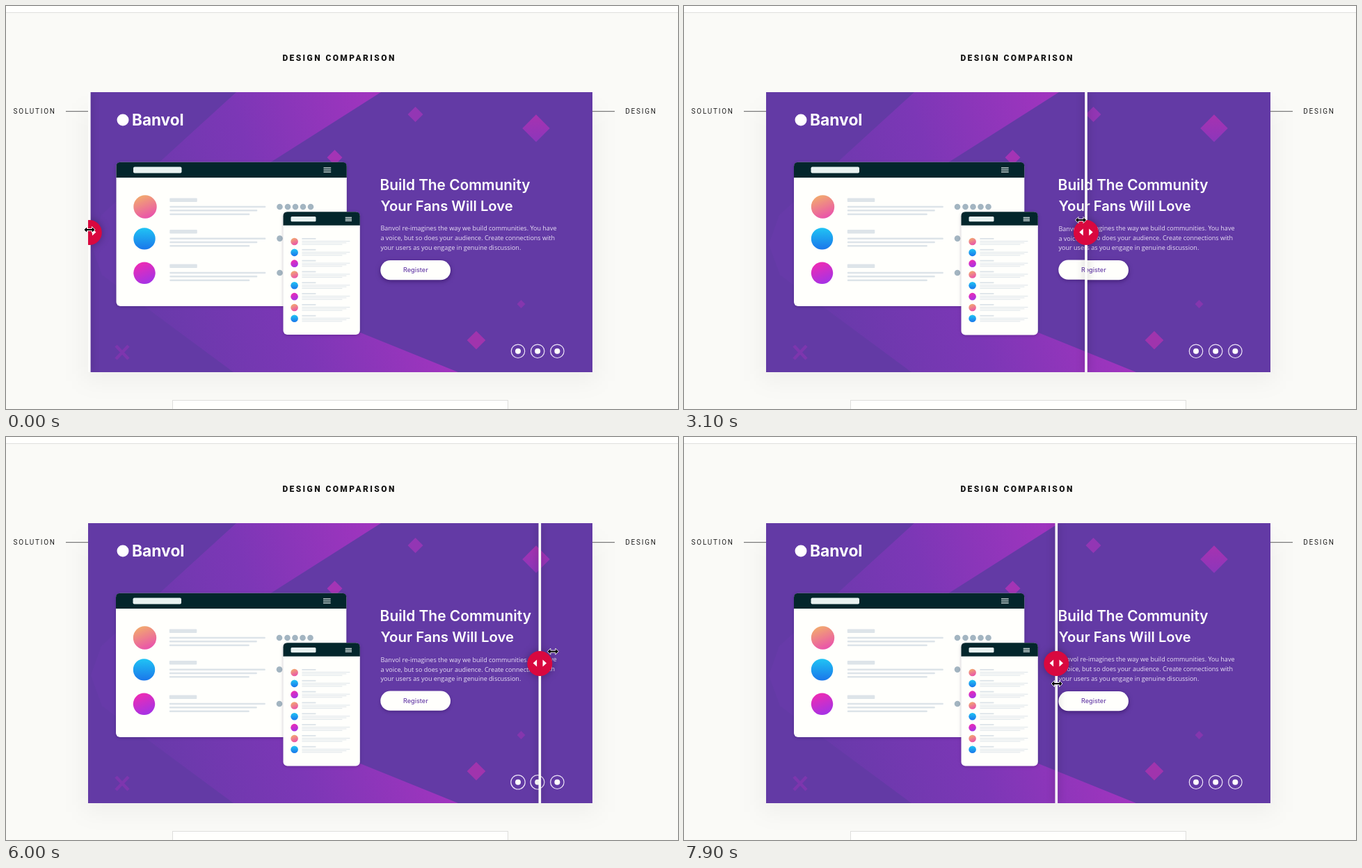
Recreate the animation shown at these times as an HTML page. Size 966 by 580 pixels, loop 8 s.

```html
<!DOCTYPE html>
<html lang="en">
<head>
<meta charset="utf-8">
<title>Design comparison</title>
<style>
html, body { margin: 0; width: 100%; height: 100%; overflow: hidden; background: #fafaf7; }
svg { display: block; }
.label { font: 400 10px Roboto, sans-serif; letter-spacing: 1.74px; fill: #222; }
.title { font: 900 12px Roboto, sans-serif; letter-spacing: 2.4px; fill: #151515; }
.brand { font: 700 22.5px Inter, sans-serif; fill: #fff; }
.head { font: 600 20.8px Inter, sans-serif; fill: #fff; }
.body { font: 400 9.03px "Open Sans", sans-serif; fill: #e9e0f5; }
.button { font: 500 9.1px Inter, sans-serif; fill: #6a41a9; text-anchor: middle; }
.soft { filter: drop-shadow(0 1px 2px rgba(20, 0, 50, .25)); }
.slider { filter: drop-shadow(0 0 6px rgba(0, 0, 0, .3)); }
</style>
</head>
<body>
<svg id="stage" width="966" height="580" viewBox="0 0 966 580"></svg>
<script>
const LEFT = 118, RIGHT = 843, TOP = 124, BOTTOM = 527, LOOP = 8000;

const rect = (x, y, w, h, fill, r = 0) =>
  `<rect x="${x}" y="${y}" width="${w}" height="${h}" rx="${r}" fill="${fill}"/>`;
const circle = (x, y, r, fill) => `<circle cx="${x}" cy="${y}" r="${r}" fill="${fill}"/>`;
const path = (d, fill) => `<path d="${d}" fill="${fill}"/>`;
const text = (x, y, style, s, extra = '') => `<text x="${x}" y="${y}" class="${style}" ${extra}>${s}</text>`;
const gradient = (id, from, to, dir = 'x2="0" y2="1"') =>
  `<linearGradient id="${id}" ${dir}><stop stop-color="${from}"/><stop offset="1" stop-color="${to}"/></linearGradient>`;
const diamond = (x, y, r, fill) => path(`M${x} ${y - r}l${r} ${r} ${-r} ${r} ${-r} ${-r}z`, fill);
const menu = (x, y, w, gap) => [0, 1, 2].map(i => rect(x, y + i * gap, w, 1.3, '#dfe9e8')).join('');
const avatars = ['url(#sun)', 'url(#sky)', 'url(#pink)'];

function panel(x, y, w, h, bar) {
  return `<g class="soft">${rect(x, y, w, h, '#fffffc', 6)}</g>` +
    path(`M${x} ${y + bar}v${6 - bar}q0-6 6-6h${w - 12}q6 0 6 6v${bar - 6}z`, '#03262c');
}

function desktop() {
  let s = panel(158.5, 224.7, 331.3, 207.3, 22.3) +
    rect(183, 231.5, 69.5, 9, '#e8f2f1', 2) + menu(456.5, 232.4, 10.7, 2.9);
  [0, 45.6, 95].forEach((dy, i) => {
    s += circle(i ? 199 : 200, 289 + dy + (i ? .3 : 0), i ? 15.7 : 16.7, avatars[i]) +
      rect(235.3, 276.5 + dy, 39.5, 5.4, '#dde4e9', 1);
    [138, 126, 115].forEach((w, k) => s += rect(235.3, 287.8 + dy + k * 5.3, w, 2.5, '#dde4e9', 1));
    s += circle(393.5, 289 + dy, 4.3, '#a3b5c1');
  });
  for (let x = 405; x < 440; x += 11) s += circle(x, 289, 4.3, '#a3b5c1');
  return s;
}

function phone(h) {
  let s = panel(398.5, 296.2, 110.3, h, 19.5) +
    rect(409.5, 303, 36, 7.3, '#e8f2f1', 1.5) + menu(487.7, 303.8, 9.3, 2.3);
  for (let i = 0; i < 8; i++) {
    const y = 339 + i * 15.83;
    s += circle(414.6, y, 5.3, avatars[i % 3]) + rect(425.4, y - 5, 20, 1.9, '#dde4e9');
    [69, 64, 58].forEach((w, k) => s += rect(425.4, y - 1 + k * 2.3, w, 1, '#dde4e9'));
  }
  return s;
}

// The built page differs from the design by fractions of a pixel.
function page(built) {
  const scale = size => `style="font-size:${size}px"`;
  const size = built ? 20.95 : 20.8;
  const lift = built ? .5 : 0;
  let s = rect(LEFT, TOP, RIGHT - LEFT, BOTTOM - TOP, '#633aa5') +
    path('M331 124H539L300 276V385L650 527H327L138 387 122 343 137 301z', 'url(#band)') +
    diamond(588.5, 156, 11, '#9336b4') + diamond(762, 176, 19.7, 'url(#gem)') +
    diamond(472.5, 218, 11, '#a434b5') + diamond(740.5, 429, 6, '#8536ae') +
    diamond(676, 481, 13.3, '#a034ad') +
    '<path d="M158 489l18 19m0-19l-18 19" stroke="#7d36ae" stroke-width="4.6"/>' +
    circle(168, 164, 8.5, '#fff') + text(181, 172.3, 'brand', 'Banvol', scale(built ? 22.8 : 22.5)) +
    `<g transform="translate(${-lift} 0)">${desktop()}</g>` + phone(built ? 177.3 : 176.7) +
    text(537.6, 265.3, 'head', 'Build The Community', scale(size)) +
    text(538.6, 295.4, 'head', 'Your Fans Will Love', scale(size - .6));
  ['Banvol re-imagines the way we build communities. You have',
    'a voice, but so does your audience. Create connections with',
    'your users as you engage in genuine discussion.'
  ].forEach((line, i) => s += text(538.5, 323.4 + i * 13.6 + lift, 'body', line));
  s += `<g style="filter:drop-shadow(0 2px ${built ? 2 : 3}px rgba(30,0,70,${built ? .3 : .5}))">` +
    rect(538.3, 366 - lift, 100.7, 28.3, '#fffffc', 14.1) + '</g>' +
    text(588.8, 383, 'button', 'Register');
  for (const x of [736, 764.2, 792.4]) {
    s += `<circle cx="${x}" cy="496.8" r="${9.7 + lift}" fill="none" stroke="#eee6f8" stroke-width="1.2"/>` +
      circle(x, 496.8, 4, '#fff');
  }
  return s;
}

const stage = document.getElementById('stage');
stage.innerHTML = `<defs>
  <linearGradient id="band" gradientUnits="userSpaceOnUse" x1="150" y1="300" x2="560" y2="180">
    <stop stop-color="#673aa9"/><stop offset=".5" stop-color="#7c37b6"/><stop offset="1" stop-color="#a334bf"/>
  </linearGradient>
  ${gradient('sun', '#f2ab6d', '#e94fae', 'x1=".3" y1="0" x2=".7" y2="1"')}
  ${gradient('sky', '#20c4f4', '#1a76ea')}
  ${gradient('pink', '#ef2bb2', '#a233e8', 'x1=".3" y1="0" x2=".7" y2="1"')}
  ${gradient('gem', '#a732b0', '#8c36bb')}
  <clipPath id="card">${rect(LEFT, TOP, RIGHT - LEFT, BOTTOM - TOP, '#000')}</clipPath>
  <clipPath id="shown"><rect id="reveal" x="${LEFT}" y="${TOP}" height="${BOTTOM - TOP}"/></clipPath>
</defs>
${rect(0, 0, 966, 580, '#fafaf7')}
${rect(0, 0, 966, 9, '#fffffd')}
${rect(0, 9, 966, 1, '#e0e0de')}
<g style="filter:blur(16px)">${rect(112, 150, 737, 390, 'rgba(0,0,0,.045)')}</g>
${text(397.4, 79, 'title', 'DESIGN COMPARISON')}
${text(10.6, 155, 'label', 'SOLUTION')}
${text(890.3, 155, 'label', 'DESIGN')}
${rect(86, 151, 32.5, 1.2, '#777')}
${rect(843, 151, 32, 1.2, '#777')}
<rect x="239.5" y="567.5" width="482" height="30" fill="#fffffd" stroke="#dededc"/>
<g clip-path="url(#card)">
  ${page(false)}
  <g clip-path="url(#shown)">${page(true)}</g>
  <g id="slider"><g class="slider">
    ${rect(-1.8, TOP, 3.6, BOTTOM - TOP, '#fdfdfa')}
    ${circle(0, 326, 18, '#d9083f')}
  </g>${path('M-9.7 325.5l5.5-5v10zM9.7 325.5l-5.5-5v10z', '#fff')}</g>
</g>
<path id="cursor" fill="#000" stroke="#fff" stroke-width=".9"/>`;

const RESIZE = 'M-8 0l4.5-4.5v3h7v-3L8 0l-4.5 4.5v-3h-7v3z';
const ARROW = 'M0 0v13.5l3-2.8 2.1 4.8 2.2-1-2.1-4.6h4.2z';

// time, slider x, cursor x, cursor y
const keys = [
  [0, 119.8, 120, 322], [600, 119.8, 120, 322], [1100, 152, 140, 322], [1500, 225, 193, 321],
  [2100, 378, 347.5, 321.5], [2400, 480, 444, 316], [3100, 578, 570.5, 308], [3300, 618, 612, 304],
  [4100, 781, 776.5, 292], [4200, 793, 789, 290], [4600, 841.3, 834, 285], [4900, 841.3, 853, 283.5],
  [5100, 841.3, 865.5, 283.5], [5300, 841.3, 865.5, 283.5], [5400, 841.3, 865.5, 284.5],
  [5500, 841.3, 865.5, 284.5], [5800, 828, 843, 298], [6400, 646, 673, 330], [6700, 614, 617, 336],
  [7000, 557, 562, 342], [7400, 607, 603, 348], [7900, 535.3, 536, 355]
];

function pose(t) {
  const i = keys.findIndex(k => k[0] >= t);
  if (i < 1) return keys[0];
  const a = keys[i - 1], b = keys[i], p = (t - a[0]) / (b[0] - a[0]);
  return a.map((v, j) => v + (b[j] - v) * p);
}

const slider = document.getElementById('slider');
const reveal = document.getElementById('reveal');
const cursor = document.getElementById('cursor');

function draw(now) {
  const [, x, cx, cy] = pose(Math.floor(now % LOOP / 100) * 100);
  slider.setAttribute('transform', `translate(${x} 0)`);
  reveal.setAttribute('width', x - LEFT);
  cursor.setAttribute('d', cx > RIGHT ? ARROW : RESIZE);
  cursor.setAttribute('transform', `translate(${cx} ${cy})`);
}

const start = performance.now();
function tick() {
  draw(performance.now() - start);
  requestAnimationFrame(tick);
}
tick();
</script>
</body>
</html>
```
